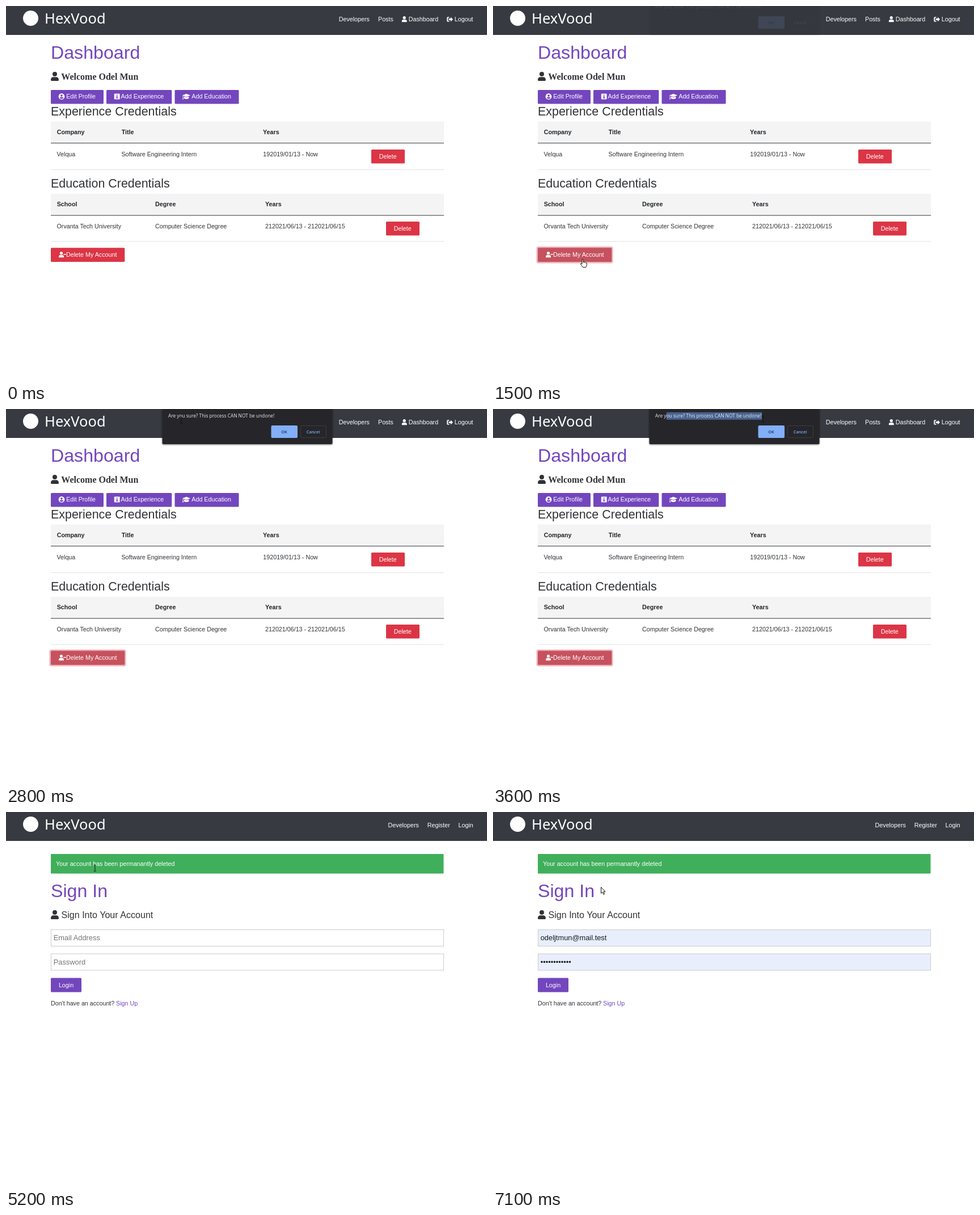
An HTML page for the animation above (7.2 s loop, 848 by 661 pixels).

```html
<!DOCTYPE html>
<html lang="en">
<head>
<meta charset="utf-8">
<title>Account dashboard</title>
<style>
  html, body { margin: 0; width: 100%; height: 100%; overflow: hidden; background: #fff; }
  svg { display: block; }
  .stage {
    --purple: #7346bd; --red: #dc3545; --ink: #303236;
    font: 10.72px "Liberation Sans", Arial, sans-serif; fill: var(--ink);
  }
  .big { font-size: 32.16px; fill: var(--purple); }
  .h2 { font-size: 21.44px; }
  .lead { font-size: 16.08px; }
  .welcome { font: bold 16px "Liberation Serif", Times, serif; }
  .brand { font: 25.5px "Noto Sans", sans-serif; }
  .bold { font-weight: bold; fill: #212529; }
  .white { fill: #fff; }
  .purple { fill: var(--purple); }
  .red { fill: var(--red); }
  .mid { text-anchor: middle; }
  .input { font-size: 12.86px; }
  .hint { fill: #757575; }
  .field { stroke: #ccc; }
  .dialog-text { font: 8.33px "Open Sans", "Noto Sans", sans-serif; fill: #e8eaed; }
  .dialog-btn { font: 600 7.3px "Open Sans", "Noto Sans", sans-serif; text-anchor: middle; }

  /* one shared 7.2 s clock */
  .dash, .login, .blank, .filled, .ring, .kill, .arrow, .hand, .beam { animation: 7.2s step-end infinite; }
  .dialog, .marked, .pointer { animation: 7.2s linear infinite; }
  .dash { animation-name: dash; }
  .login { animation-name: login; }
  .blank { animation-name: blank; }
  .filled { animation-name: filled; }
  .ring { animation-name: ring; }
  .kill { animation-name: kill; }
  .arrow { animation-name: arrow; }
  .hand { animation-name: hand; }
  .beam { animation-name: beam; }
  .dialog { animation-name: dialog; }
  .marked { animation-name: marked; transform-origin: 305.7px 0; }
  .pointer { animation-name: pointer; }

  @keyframes dash { 0% { opacity: 1 } 62.48%, 100% { opacity: 0 } }
  @keyframes login { 0% { opacity: 0 } 62.48%, 100% { opacity: 1 } }
  @keyframes blank { 0% { opacity: 1 } 74.98%, 100% { opacity: 0 } }
  @keyframes filled { 0% { opacity: 0 } 74.98%, 100% { opacity: 1 } }
  @keyframes ring { 0% { opacity: 0 } 19.43%, 100% { opacity: 1 } }
  @keyframes kill { 0% { fill: #dc3545 } 15.26% { fill: #c82f3f } 19.43%, 100% { fill: #c5525e } }
  @keyframes arrow {
    0% { opacity: 0 } 1.38% { opacity: 1 } 15.26% { opacity: 0 }
    23.6% { opacity: 1 } 36.1% { opacity: 0 } 52.76% { opacity: 1 }
    66.65% { opacity: 0 } 90.26%, 100% { opacity: 1 }
  }
  @keyframes hand { 0% { opacity: 0 } 15.26% { opacity: 1 } 23.6%, 100% { opacity: 0 } }
  @keyframes beam {
    0% { opacity: 0 } 36.1% { opacity: 1 } 52.76% { opacity: 0 }
    66.65% { opacity: 1 } 90.26%, 100% { opacity: 0 }
  }
  @keyframes dialog {
    0%, 19.44% { opacity: 0; transform: translateY(-14px) }
    20.83% { opacity: .1; transform: translateY(-11px) }
    22.22% { opacity: .75; transform: translateY(-4px) }
    23.61%, 59.72% { opacity: 1; transform: none }
    61.11% { opacity: .98; transform: translateY(-2px) }
    62.5% { opacity: .2; transform: translateY(-10px) }
    63.89%, 100% { opacity: 0; transform: translateY(-14px) }
  }
  @keyframes marked { 0%, 40.28% { transform: scaleX(0) } 50%, 100% { transform: scaleX(1) } }
  @keyframes pointer {
    0%, 1.39% { transform: translate(330px, 505px) }
    11.11% { transform: translate(185px, 460px) }
    16.67%, 22.22% { transform: translate(158px, 446px) }
    29.17% { transform: translate(465px, 180px) }
    31.94% { transform: translate(500px, 85px) }
    35% { transform: translate(420px, 34px) }
    38.89%, 40.28% { transform: translate(309px, 20px) }
    50%, 52% { transform: translate(476px, 18px) }
    58.33%, 62.5% { transform: translate(487px, 37px) }
    68% { transform: translate(280px, 92px) }
    72.22% { transform: translate(157px, 99px) }
    76.5%, 81.94% { transform: translate(105px, 97px) }
    88.2% { transform: translate(290px, 98px) }
    93.06% { transform: translate(395px, 133px) }
    98.61%, 100% { transform: translate(190px, 132px) }
  }
</style>
</head>
<body>
<svg class="stage" width="848" height="661" viewBox="0 0 848 661">
  <defs>
    <filter id="shadow" x="-10%" y="-10%" width="120%" height="130%">
      <feDropShadow dx="0" dy="1" stdDeviation="1.8" flood-opacity=".5"/>
    </filter>
    <symbol id="user" viewBox="0 0 14 16">
      <circle cx="7" cy="4" r="4"/>
      <path d="M0 14.3C0 11 2 9.3 4.2 9.3h5.6c2.2 0 4.2 1.7 4.2 5q0 1.7-1.5 1.7h-11Q0 16 0 14.3z"/>
    </symbol>
  </defs>

  <rect width="848" height="51" fill="#373a41"/>
  <g class="white">
    <circle cx="43.5" cy="21.5" r="13.5"/>
    <text class="brand" x="68" y="31">HexVood</text>
  </g>

  <g class="dash">
    <g class="white">
      <text x="586.7" y="27.3">Developers</text>
      <text x="656" y="27.3">Posts</text>
      <use href="#user" x="697.5" y="18" width="9.5" height="10.5"/>
      <text x="709.7" y="27.3">Dashboard</text>
      <path d="M781.5 19.2h-2.6q-1.6 0-1.6 1.6v5.4q0 1.6 1.6 1.6h2.6v-1.6h-2.3v-5.4h2.3zM788 23.5l-4-4v2.4h-3.4v3.2h3.4v2.4z"/>
      <text x="790.8" y="27.3">Logout</text>
    </g>

    <text class="big" x="79" y="93">Dashboard</text>
    <use href="#user" x="79" y="116" width="14" height="16"/>
    <text class="welcome" x="97.3" y="130">Welcome Odel Mun</text>

    <g class="purple">
      <rect x="79" y="148" width="93" height="24.5" rx="1.5"/>
      <rect x="177" y="148" width="115.3" height="24.5" rx="1.5"/>
      <rect x="297.5" y="148" width="113" height="24.5" rx="1.5"/>
    </g>
    <g class="white">
      <circle cx="98" cy="159.5" r="5.4"/>
      <rect x="190.8" y="154.6" width="9.8" height="9.8" rx="1"/>
      <path d="M318 154.8l7.2 2.7-7.2 2.7-7.2-2.7zM314 159.6l4 1.5 4-1.5.5 3.1q-4.5 2.6-9 0zM311.6 158.2h.9v4l.6 2.2h-2.1l.6-2.2z"/>
      <text x="106.2" y="163.3">Edit Profile</text>
      <text x="202.6" y="163.3">Add Experience</text>
      <text x="327.3" y="163.3">Add Education</text>
    </g>
    <g class="purple">
      <circle cx="98" cy="157.9" r="1.8"/>
      <path d="M94.8 162.6q.4-2 2.2-2h2q1.8 0 2.2 2-3.200 2.200-6.400 0z"/>
      <path d="M194.900 156h1.700v1.600h-1.700zM194.300 158.500h2.300v3.200h.7v1.200h-3v-1.200h.7v-2h-.7z"/>
    </g>

    <text class="h2" x="79" y="192.800">Experience Credentials</text>
    <rect x="79" y="203.500" width="693" height="38" fill="#f4f4f4"/>
    <rect x="79" y="241" width="693" height="1.200" fill="#55585c"/>
    <rect x="79" y="288" width="693" height="1" fill="#dee2e6"/>
    <g class="bold">
      <text x="89.700" y="226.300">Company</text>
      <text x="203.700" y="226.300">Title</text>
      <text x="453" y="226.300">Years</text>
    </g>
    <text x="89.500" y="265">Velqua</text>
    <text x="203.400" y="265">Software Engineering Intern</text>
    <text x="453.300" y="265">192019/01/13 - Now</text>

    <text class="h2" x="79" y="319.800">Education Credentials</text>
    <rect x="79" y="331" width="693" height="38" fill="#f4f4f4"/>
    <rect x="79" y="368.500" width="693" height="1.200" fill="#55585c"/>
    <rect x="79" y="414.500" width="693" height="1" fill="#dee2e6"/>
    <g class="bold">
      <text x="89.700" y="353.300">School</text>
      <text x="263" y="353.300">Degree</text>
      <text x="457" y="353.300">Years</text>
    </g>
    <text x="89.500" y="392">Orvanta Tech University</text>
    <text x="263" y="392">Computer Science Degree</text>
    <text x="457" y="392">212021/06/13 - 212021/06/15</text>

    <g class="red">
      <rect x="644" y="253" width="59" height="24.500" rx="1.500"/>
      <rect x="670" y="380" width="59" height="24.500" rx="1.500"/>
    </g>
    <rect class="ring" x="76.500" y="424" width="135" height="29.500" rx="3" fill="#f3b3ba"/>
    <rect class="kill" x="79" y="426.300" width="130.300" height="24.700" rx="1.500"/>
    <g class="white">
      <text class="mid" x="673.200" y="268.700">Delete</text>
      <text class="mid" x="699.200" y="395.700">Delete</text>
      <use href="#user" x="92" y="433" width="11" height="10.500"/>
      <rect x="101.500" y="437" width="4.300" height="1.500"/>
      <text x="106" y="442.300">Delete My Account</text>
    </g>
  </g>

  <g class="login">
    <g class="white">
      <text x="673.600" y="27.300">Developers</text>
      <text x="742.800" y="27.300">Register</text>
      <text x="797.500" y="27.300">Login</text>
    </g>
    <rect x="79" y="74" width="692.500" height="34.500" rx="1" fill="#40af5b"/>
    <text class="white" x="88" y="95">Your account has been permanantly deleted</text>
    <text class="big" x="79" y="150">Sign In</text>
    <use href="#user" x="79" y="173" width="14" height="16"/>
    <text class="lead" x="97.500" y="187">Sign Into Your Account</text>

    <g class="blank">
      <g class="field" fill="#fff">
        <rect x="79.500" y="207.500" width="692" height="29"/>
        <rect x="79.500" y="250" width="692" height="29"/>
      </g>
      <g class="input hint">
        <text x="83.700" y="225.500">Email Address</text>
        <text x="83.700" y="268.500">Password</text>
      </g>
    </g>
    <g class="filled">
      <g class="field" fill="#e8eefc">
        <rect x="79.500" y="207.500" width="692" height="29"/>
        <rect x="79.500" y="250" width="692" height="29"/>
      </g>
      <g class="input" fill="#17181a">
        <text x="83.700" y="225.500">odeljtmun@mail.test</text>
        <text x="83.700" y="268.500">••••••••••••</text>
      </g>
    </g>

    <rect class="purple" x="79" y="292.500" width="54" height="25" rx="1.500"/>
    <text class="white mid" x="106" y="308.500">Login</text>
    <text x="79" y="340.500">Don't have an account?</text>
    <text class="purple" x="194" y="340.500">Sign Up</text>
  </g>

  <g class="dialog">
    <rect x="275.500" y="-20" width="300" height="82" rx="2" fill="#27282c" filter="url(#shadow)"/>
    <rect class="marked" x="305.700" y="5.800" width="168.500" height="13" fill="#48648f"/>
    <text class="dialog-text" x="286" y="15.300">Are you sure? This process CAN NOT be undone!</text>
    <rect x="467.500" y="29" width="46.500" height="22" rx="2" fill="#82aff8"/>
    <rect x="519.500" y="29.500" width="45" height="21" rx="2" fill="none" stroke="#3b3d42"/>
    <text class="dialog-btn" x="490.500" y="42.700" fill="#26324a">OK</text>
    <text class="dialog-btn" x="541.500" y="42.700" fill="#82aff8">Cancel</text>
  </g>

  <g class="pointer" stroke="#111" stroke-linejoin="round">
    <path class="arrow" fill="#fff" d="M.5.5v10.800l2.400-2.200 1.900 4.200 1.900-.9-1.900-4h3.200z"/>
    <path class="hand" fill="#fff" d="M-1 1Q0-.6 1.200 1v5l1-.6 1.200.8 1.300-.3 1 .9q1.800-.2 1.800 1.500 0 4-1.700 6.200H.3Q-1 12-3.500 9.300q-.3-1.800 1.200-1.500L-1 9z"/>
    <path class="beam" fill="none" d="M-2-5.500Q0-5.500 0-4.500Q0-5.500 2-5.500M0-4.500v9M-2 5.500Q0 5.500 0 4.500Q0 5.500 2 5.500"/>
  </g>
</svg>
</body>
</html>
```
